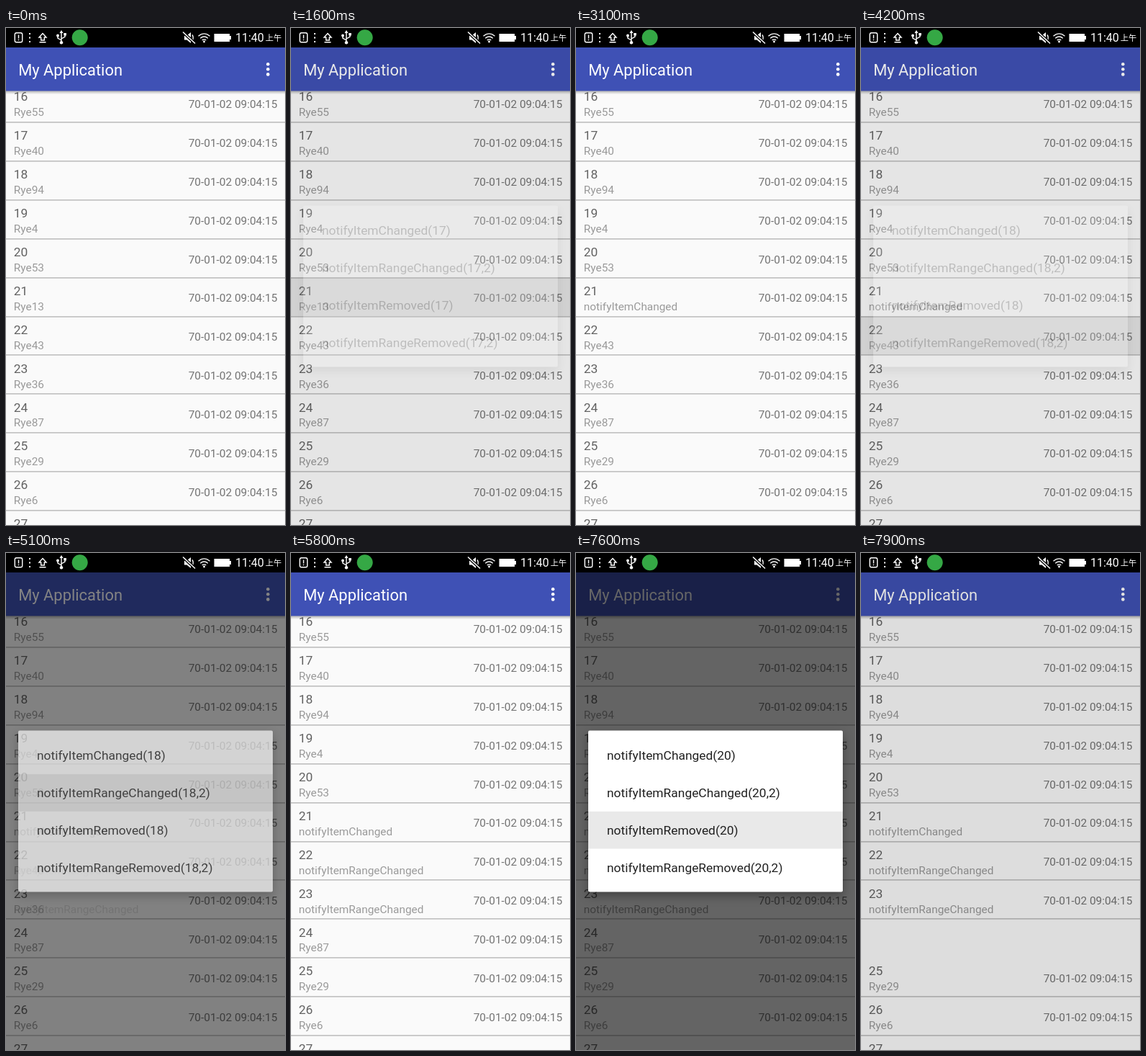
An HTML page for the animation above (8 s loop, 388x690 px).

```html
<!DOCTYPE html>
<html lang="en">
<head>
<meta charset="utf-8">
<title>My Application</title>
<style>
  html, body { margin: 0; width: 100%; height: 100%; overflow: hidden; background: #fafafa; }
  svg { display: block; width: 388px; height: 690px; font-family: Roboto, "Noto Sans CJK SC", "Noto Sans", sans-serif; }
  .num { font-size: 17.4px; fill: #626262; }
  .sub { font-size: 15.4px; fill: #9a9a9a; }
  .time { font-size: 15.4px; fill: #747474; text-anchor: end; }
  .item { font-size: 17.4px; fill: #212121; }
  .dialog { filter: drop-shadow(0 5px 7px rgba(0, 0, 0, .35)); }
  .line { fill: none; stroke: #fff; stroke-width: 1.4; }
</style>
</head>
<body>
<svg viewBox="0 0 388 690">
  <defs>
    <linearGradient id="shade" x2="0" y2="1">
      <stop stop-opacity=".3"/>
      <stop offset="1" stop-opacity="0"/>
    </linearGradient>
  </defs>
  <rect width="388" height="690" fill="#fafafa"/>
  <g id="rows"></g>

  <rect y="87" width="388" height="5" fill="url(#shade)"/>
  <rect y="27" width="388" height="60.4" fill="#3f51b5"/>
  <text x="17.2" y="65.7" font-size="21.9" fill="#fff">My Application</text>
  <g fill="#fff">
    <circle cx="364.3" cy="50.2" r="2.3"/>
    <circle cx="364.3" cy="57.3" r="2.3"/>
    <circle cx="364.3" cy="64.4" r="2.3"/>
  </g>

  <rect id="dim" y="27" width="388" height="663" opacity="0"/>
  <g id="dialogs"></g>

  <rect width="388" height="27"/>
  <g fill="#fff">
    <path class="line" d="M14.5 6.7H20.5Q22.7 6.7 22.7 9V17.5Q22.7 19.7 20.5 19.7H14.5Q12.3 19.7 12.3 17.5V9Q12.3 6.7 14.5 6.7Z"/>
    <path class="line" d="M17.5 9.5V14.5M17.5 15.8V17.2"/>
    <path d="M32 7h2v2h-2zM32 12.5h2v2h-2zM32 18h2v2h-2z"/>
    <path class="line" d="M51 7.6L56 13H53.3V17H48.7V13H46ZM46.5 19.8H55.5"/>
    <path class="line" d="M77 6V20M77 17L72 14V11M77 15L82 12V9.5"/>
    <path d="M77 3L79.5 7H74.5ZM80.3 7h3.6v3.6h-3.6z"/>
    <circle cx="72" cy="10.5" r="1.9"/>
    <circle cx="77" cy="20.3" r="2.2"/>
    <circle cx="102.7" cy="13.2" r="11" fill="#35a845"/>
    <path d="M248 10.5H251.5L257 6V21L251.5 16.5H248Z"/>
    <path class="line" d="M259 9.5Q261.6 13.5 259 17.5"/>
    <path d="M246.5 6L263 21.5" stroke="#000" stroke-width="4"/>
    <path d="M246 5.5L263 21.5" stroke="#fff" stroke-width="1.5"/>
    <path class="line" d="M267.5 11.2Q275.5 4.6 283.5 11.2M270.2 14.2Q275.5 9.8 280.8 14.2M272.7 17Q275.5 14.7 278.3 17"/>
    <circle cx="275.5" cy="19" r="1.4"/>
    <path d="M289.5 8H311V11H313V16H311V19H289.5Z"/>
    <text x="319" y="19.2" font-size="16">11:40</text>
    <text x="360.8" y="18.4" font-size="11.3">上午</text>
  </g>
</svg>
<script>
const LOOP = 8000, PITCH = 53.9, TOP = 77.1, ITEM = 51.75;
const CLOSE = 220, FADE = 250;
const byId = id => document.getElementById(id);

function add(parent, tag, attrs, text) {
  const el = document.createElementNS('http://www.w3.org/2000/svg', tag);
  for (const k in attrs) el.setAttribute(k, attrs[k]);
  if (text) el.textContent = text;
  parent.append(el);
  return el;
}

// steps: [time, opacity] pairs; the ends are held
function fade(el, steps) {
  const all = [[0, steps[0][1]], ...steps, [LOOP, steps[steps.length - 1][1]]];
  el.animate(all.map(([t, opacity]) => ({ offset: t / LOOP, opacity })),
    { duration: LOOP, iterations: Infinity });
}

// pos: list position, pick: chosen item, times in ms
const dialogs = [
  { pos: 17, pick: 0, press: 1080, open: 1575, tap: 2500, close: 2870 },
  { pos: 18, pick: 1, press: 3680, open: 4175, tap: 4750, close: 5060 },
  { pos: 20, pick: 2, press: 6280, open: 6773, tap: 7500, close: 7724 }
];
const changes = {
  21: ['notifyItemChanged', dialogs[0].close - 30],
  22: ['notifyItemRangeChanged', dialogs[1].close - 30],
  23: ['notifyItemRangeChanged', dialogs[1].close - 30]
};
const names = [55, 40, 94, 4, 53, 13, 43, 36, 87, 29, 6, 18];

names.forEach((n, i) => {
  const id = 16 + i, y = TOP + PITCH * i;
  const row = add(byId('rows'), 'g', {});
  const held = dialogs.find(d => d.pos + 4 === id);
  if (held) {
    const glow = add(row, 'rect', { y, width: 388, height: PITCH, opacity: 0 });
    fade(glow, [[held.press, 0], [held.press + 120, .085], [held.open + 40, .085], [held.open + 120, 0]]);
  }
  add(row, 'rect', { y: Math.round(y + PITCH) - .7, width: 388, height: 1.2, fill: '#acacac' });
  add(row, 'text', { class: 'num', x: 10.8, y: y + 24.2 }, String(id));
  const sub = { class: 'sub', x: 10.8, y: y + 45.1 };
  const before = add(row, 'text', sub, 'Rye' + n);
  add(row, 'text', { class: 'time', x: 377.3, y: y + 33.8 }, '70-01-02 09:04:15');
  if (changes[id]) {
    const [label, at] = changes[id];
    const after = add(row, 'text', { ...sub, opacity: 0 }, label);
    fade(before, [[at, 1], [at + FADE, 0]]);
    fade(after, [[at, 0], [at + FADE, 1]]);
  }
  if (id === 24) fade(row, [[dialogs[2].close + 10, 1], [dialogs[2].close + 130, 0]]);
});

for (const { pos, pick, open, tap, close } of dialogs) {
  const box = add(byId('dialogs'), 'g', { class: 'dialog', opacity: 0 });
  add(box, 'rect', { x: 17, y: 246.5, width: 354, height: 224, rx: 2, fill: '#fff' });
  const glow = add(box, 'rect', { x: 17, y: 255.3 + ITEM * pick, width: 354, height: ITEM, opacity: 0 });
  fade(glow, [[tap, 0], [tap + 100, .09]]);
  [`Changed(${pos})`, `RangeChanged(${pos},2)`, `Removed(${pos})`, `RangeRemoved(${pos},2)`]
    .forEach((s, i) => add(box, 'text', { class: 'item', x: 43, y: 287.4 + ITEM * i }, 'notifyItem' + s));
  fade(box, [[open, 0], [open + 130, 1], [close, 1], [close + 120, 0]]);
}

fade(byId('dim'), dialogs.flatMap(({ open, close }) =>
  [[open, 0], [open + 190, .6], [close, .6], [Math.min(close + CLOSE, LOOP), 0]]));
</script>
</body>
</html>
```
